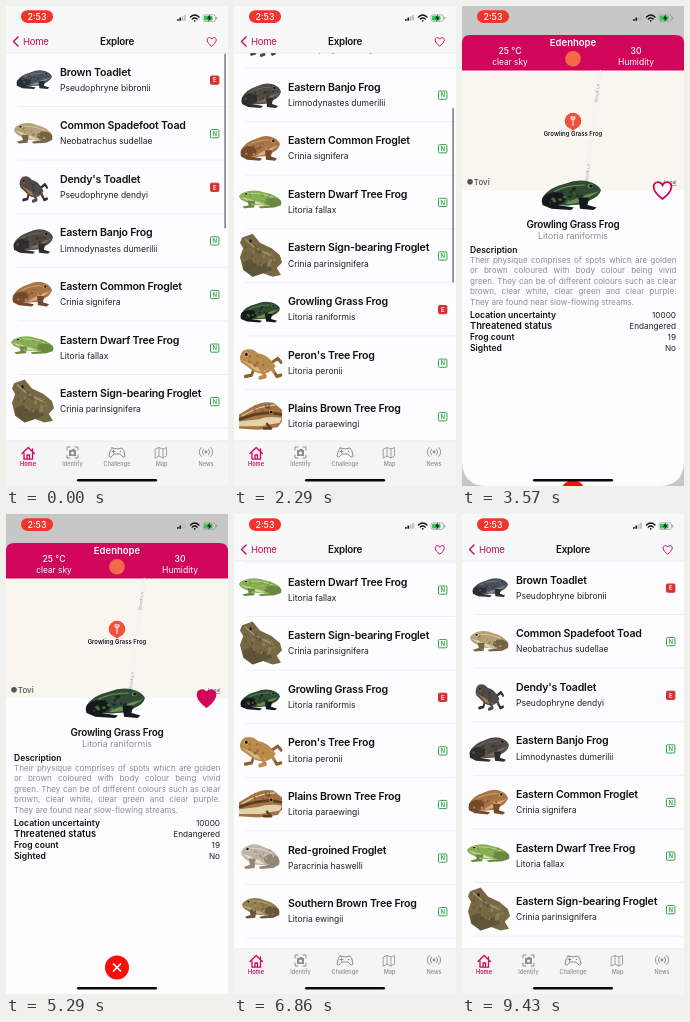
An HTML page for the animation above (9.57 s loop, 222 by 480 pixels).

```html
<!DOCTYPE html>
<html lang="en">
<head>
<meta charset="utf-8">
<title>Explore frogs</title>
<style>
  html, body { margin: 0; width: 100%; height: 100%; overflow: hidden; background: #fdfcfe; }
  svg { display: block; width: 100vw; height: 100vh; font-family: Inter, Roboto, "Liberation Sans", sans-serif; }
  .name { font-size: 10.6px; font-weight: 600; letter-spacing: -.21px; fill: #111; }
  .latin { font-size: 8.5px; fill: #222; }
  .bold { font-weight: 600; fill: #111; }
  .mid { text-anchor: middle; }
  .end { text-anchor: end; }
  .about { font-size: 8.1px; line-height: 10.5px; color: #8e8e92; }
  .about div { height: 10.5px; text-align-last: justify; }
  .about div:last-child { text-align-last: left; }
</style>
</head>
<body>
<svg id="stage" viewBox="0 0 222 480" preserveAspectRatio="none"></svg>
<script>
const LOOP = 9570, STEP = LOOP / 67;
const ROW = 53.6, LIST_TOP = 47, PINK = '#d1065b', PAPER = '#fdfcfe';
const HEART = 'M0 4.2C-6.2-.4-4.6-4-2.2-4Q-.7-4 0-2.5Q.7-4 2.2-4C4.6-4 6.2-.4 0 4.2Z';

const text = (x, y, str, cls = '', extra = '') =>
  `<text x="${x}" y="${y}" class="${cls}" ${extra}>${str}</text>`;
const path = (d, fill, extra = '') => `<path d="${d}" fill="${fill}" ${extra}/>`;
const line = (d, color, width = 1) =>
  path(d, 'none', `stroke="${color}" stroke-width="${width}" stroke-linecap="round" stroke-linejoin="round"`);
const rect = (x, y, w, h, fill, extra = '') =>
  `<rect x="${x}" y="${y}" width="${w}" height="${h}" fill="${fill}" ${extra}/>`;
const dot = (x, y, r, fill, extra = '') => `<circle cx="${x}" cy="${y}" r="${r}" fill="${fill}" ${extra}/>`;

function random(seed) {
  return () => (seed = (seed * 16807) % 2147483647) / 2147483647;
}

function speckles(seed, color, x, y, w, h, count = 14) {
  const next = random(seed * 7919 + 17);
  let out = '';
  for (let i = 0; i < count; i++) {
    out += dot((x + next() * w).toFixed(1), (y + next() * h).toFixed(1), (.4 + next() * .9).toFixed(1), color, 'opacity=".6"');
  }
  return out;
}

// Poses are drawn in a 40 x 24 space with the head on the right.
const poses = {
  sit: ([skin, dark, pale], seed) =>
    path('M1 14Q5 6 16 3Q24-1 31 1Q38 3 40 8Q39 13 33 16Q29 20 21 20Q8 22 1 14Z', skin) +
    path('M39 9Q33 13 29 16Q23 20 16 19Q25 13 39 9Z', pale) +
    path('M1 20Q-1 13 5 11Q12 8 16 13Q18 18 11 20L22 22L20 24L7 23Z', dark) +
    path('M25 14L32 14L31 20L37 22L35 24L26 23Z', dark) +
    line('M9 9Q17 4 29 4', pale, .8) +
    speckles(seed, dark, 9, 6, 23, 9) + speckles(seed + 50, pale, 4, 9, 24, 10, 8) +
    dot(33, 4.8, 1.8, pale) + dot(33.3, 4.8, 1.2, '#111'),

  climb: ([skin, dark, pale], seed) =>
    line('M12 13L3 8L0 11M9 15L4 22L0 21M25 14L28 21L34 22', dark, 2.6) +
    path('M5 14Q12 5 22 4Q28-1 36 2Q41 6 38 11Q31 15 26 18Q14 23 5 14Z', skin) +
    path('M38 9Q30 13 25 17Q18 20 14 18Q26 13 38 9Z', pale) +
    line('M20 15L15 22L20 23M12 12L7 18', skin, 3) +
    speckles(seed, dark, 12, 6, 19, 8) +
    dot(33, 5, 2, pale) + dot(33, 5, 1.3, '#111'),

  rough: ([skin, dark, pale], seed) =>
    path('M2 2L12 0L19 5L30 8L38 12L40 16L35 19L39 23L31 24L22 22L12 24L3 20L0 13L3 8L0 5Z', skin) +
    path('M3 16L10 14L17 18L27 16L31 20L22 22L12 24L3 20Z', dark, 'opacity=".6"') +
    line('M5 3L15 8L29 12', pale, 1) +
    speckles(seed, dark, 5, 7, 16, 13) + speckles(seed + 50, pale, 12, 9, 22, 10) +
    dot(10, 4, 1, '#111'),

  closeup: ([skin, dark, pale], seed) =>
    path('M0 7L8 1Q18-1 29 5L40 11V23L22 24L4 22L0 17Z', skin) +
    path('M0 14Q12 12 22 15L40 17V21L20 21L2 18Z', pale) +
    line('M1 11Q16 7 39 15', dark, 2.4) + line('M7 3Q20 3 37 12', pale, 1) +
    line('M14 19L10 23L17 23', dark, 2) + speckles(seed, dark, 8, 3, 18, 6) +
    dot(10, 9, 2, '#c78f48') + dot(10, 9, 1.2, '#111')
};

function frog(pose, colors, x, y, w, h, left, seed) {
  const flip = left ? `translate(${x + w} ${y}) scale(${-w / 40} ${h / 24})`
                    : `translate(${x} ${y}) scale(${w / 40} ${h / 24})`;
  return `<g transform="${flip}">${poses[pose](colors, seed)}</g>`;
}

const growling = ['#2f4a35', '#14191b', '#6f9150'];
// name, latin, endangered, pose, colours, x, y offset, width, height, faces left
const species = [
  ['Brown Toadlet', 'Pseudophryne bibronii', 1, 'sit', ['#4b515b', '#292e37', '#858a92'], 10, -10, 36, 19, 0],
  ['Common Spadefoot Toad', 'Neobatrachus sudellae', 0, 'sit', ['#b5a077', '#776444', '#e0d3ae'], 8, -11, 39, 21, 1],
  ["Dendy's Toadlet", 'Pseudophryne dendyi', 1, 'climb', ['#514b47', '#34302f', '#a47b4d'], 13, -12, 28, 27, 1],
  ['Eastern Banjo Frog', 'Limnodynastes dumerilii', 0, 'sit', ['#4f4b46', '#2f2d2b', '#776d61'], 7, -12, 40, 25, 0],
  ['Eastern Common Froglet', 'Crinia signifera', 0, 'sit', ['#a87445', '#75492b', '#d6ac80'], 6, -13, 40, 25, 0],
  ['Eastern Dwarf Tree Frog', 'Litoria fallax', 0, 'sit', ['#86b052', '#68893f', '#d5d7a5'], 5, -12, 43, 18, 1],
  ['Eastern Sign-bearing Froglet', 'Crinia parinsignifera', 0, 'rough', ['#756843', '#4f4830', '#a0946c'], 6, -22, 42, 43, 0],
  ['Growling Grass Frog', 'Litoria raniformis', 1, 'sit', growling, 6, -8, 40, 21, 0],
  ["Peron's Tree Frog", 'Litoria peronii', 0, 'climb', ['#b98b4d', '#8c6131', '#dcba7f'], 5, -15, 42, 31, 1],
  ['Plains Brown Tree Frog', 'Litoria paraewingi', 0, 'closeup', ['#a47343', '#5c3c23', '#e3d1ac'], 5, -15, 43, 28, 1],
  ['Red-groined Froglet', 'Paracrinia haswelli', 0, 'sit', ['#c0b6a6', '#948672', '#e6dfd3'], 7, -14, 39, 25, 1],
  ['Southern Brown Tree Frog', 'Litoria ewingii', 0, 'sit', ['#937f54', '#66563a', '#bda879'], 8, -14, 38, 21, 1]
];

function badge(y, endangered) {
  const [letter, fill, ink] = endangered ? ['E', '#d9302f', '#fff'] : ['N', '#fff', '#31a348'];
  return rect(204.5, y - 4, 8.4, 8.2, fill, `rx="1" stroke="${endangered ? fill : ink}"`) +
    text(208.7, y + 2.3, letter, 'mid', `font-size="6" font-weight="600" fill="${ink}"`);
}

function listRow([name, latin, endangered, pose, colors, x, dy, w, h, left], i) {
  const y = 74 + ROW * i;
  return line(`M12 ${y + 26.5}H222`, '#e6e5e8', .6) +
    frog(pose, colors, x, y + dy, w, h, left, i + 1) +
    text(54, y - 4.4, name, 'name') + text(54, y + 10.8, latin, 'latin') + badge(y, endangered);
}

const navBar = () => rect(0, 0, 222, LIST_TOP, '#f8f8f8') +
  line('M0 47H222', '#dcdcde', .5) +
  line('M12 31L7.5 35.5L12 40', PINK, 1.4) +
  text(17, 39, 'Home', '', `font-size="9.5" letter-spacing="-.25" fill="${PINK}"`) +
  text(111, 39, 'Explore', 'bold mid', 'font-size="9.8" letter-spacing="-.25"') +
  path(HEART, 'none', `stroke="${PINK}" stroke-width=".9" transform="translate(205.7 35.8) scale(1.05)"`);

function tabBar() {
  const gray = '#8d8d92';
  const icons = [
    line('M16 447.5L22.2 441.5L28.4 447.5M18 447V453.2H26.5V447M21 453V449H23.5V453M26.5 443V445', PINK, 1.3),
    line('M61 444V441H64M69 441H72V444M72 449V452H69M64 452H61V449', gray, 1) +
      path('M63 444H65L66 443H68L69 444H70V450H63Z', gray) + dot(66.5, 447, 1.5, '#f7f7f7'),
    line('M106 442Q111 444 116 442Q118 443 119 450Q118 453 114 448H108Q104 453 103 450Q104 443 106 442ZM106 445.5H109M107.5 444V447', gray, 1) +
      dot(114.5, 445.5, .8, gray),
    line('M149.5 443L153 441.5L157 443L160.5 441.5V450L157 452L153 450L149.5 452ZM153 441.5V450M157 443V452', gray, .8),
    dot(200, 446, 1.4, gray) +
      line('M197.5 443Q195 446 197.5 449M202.5 443Q205 446 202.5 449M195.3 441.5Q191 446 195.3 450.5M204.7 441.5Q209 446 204.7 450.5', gray, .9)
  ];
  const labels = ['Home', 'Identify', 'Challenge', 'Map', 'News'];
  return rect(0, 435, 222, 45, '#f5f5f6') + line('M0 435H222', '#d4d4d7', .5) + icons.join('') +
    labels.map((label, i) => text(22 + 44.5 * i, 459.8, label, 'mid',
      `font-size="5.6" font-weight="${i ? 500 : 600}" fill="${i ? gray : PINK}"`)).join('');
}

const statusBar = () => rect(15, 4.3, 32, 12.6, '#f0362c', 'rx="6.2"') +
  text(31, 13.7, '2:53', 'mid', 'font-size="8.8" font-weight="500" fill="#fff"') +
  [0, 1, 2, 3].map(i => rect(171 + 2.4 * i, 13 - 1.4 * i, 1.7, 1.8 + 1.4 * i, i < 2 ? '#111' : '#bbb', 'rx=".4"')).join('') +
  line('M184.5 11Q188.7 7.2 193 11M186.3 13Q188.7 11 191.2 13', '#111', 1.4) + dot(188.7, 14.8, .9, '#111') +
  rect(197, 8.8, 12.5, 6.6, 'none', 'rx="2" stroke="#999" stroke-width=".7"') +
  rect(198, 9.8, 8.5, 4.6, '#35c759', 'rx="1.2"') + rect(210.2, 10.8, 1, 2.6, '#999', 'rx=".5"') +
  path('M204 8.5L201 12.5H203L202.3 15.8L205.5 11.6H203.5Z', '#111');

function mapView() {
  const road = (x, y) => text(x, y, 'Brook Ln', 'mid', `font-size="4.3" fill="#999" transform="rotate(-83 ${x} ${y})"`);
  return rect(0, 64.5, 222, 119.5, '#f9f6ef') +
    line('M138.5 65L122.5 184', '#e9e7e5', 2.2) + line('M138.5 65L122.5 184', '#fdfcfa', 1.2) +
    road(136.5, 87) + road(127, 167) +
    path('M108 122L111 125L114 122Z', '#ef513c') + dot(111, 115, 8.3, '#ef513c') +
    line('M109.2 110.5V113Q111 114.5 112.8 113V110.5M111 110.5V119.5', '#fff', 1) +
    text(111, 130.2, 'Growling Grass Frog', 'mid bold', 'font-size="5.9" letter-spacing=".05" stroke="#fff" stroke-width="1" paint-order="stroke"') +
    dot(8, 175.7, 2.8, '#55555a') +
    text(11.8, 178.5, 'Tovi', '', 'font-size="8" font-weight="500" fill="#55555a"') +
    text(214.5, 178, 'Legal', 'end', 'font-size="5" fill="#555" text-decoration="underline"');
}

function sheet() {
  const white = (x, y, str, size, weight = 500) =>
    text(x, y, str, 'mid', `font-size="${size}" font-weight="${weight}" fill="#fff"`);
  const about = ['Their physique comprises of spots which are golden', 'or brown coloured with body colour being vivid',
    'green. They can be of different colours such as clear', 'brown, clear white, clear green and clear purple.',
    'They are found near slow-flowing streams.'];
  const facts = [['Location uncertainty', '10000'], ['Threatened status', 'Endangered'], ['Frog count', '19'], ['Sighted', 'No']];
  return path('M0 480V37Q0 29 8 29H214Q222 29 222 37V480Z', PAPER) +
    path('M0 65V37Q0 29 8 29H214Q222 29 222 37V65Z', PINK) +
    white(111, 40.2, 'Edenhope', 9.5, 600) + white(48, 48.3, '25 °C', 8.6) + white(48, 59, 'clear sky', 8.3, 400) +
    white(174, 48.3, '30', 8.6) + white(174, 59, 'Humidity', 8.5, 400) + dot(111, 52.7, 7.8, '#f16b49') +
    mapView() + frog('sit', growling, 79, 174, 60, 30, 0, 8) +
    path(HEART, '#fff', `id="heart" stroke="${PINK}" stroke-width=".9" transform="translate(200.5 184.3) scale(2.05)"`) +
    text(111, 221.5, 'Growling Grass Frog', 'name mid', 'style="font-size:9.9px"') +
    text(111, 233.4, 'Litoria raniformis', 'mid', 'font-size="8.8" fill="#8e8e92"') +
    text(8, 247.2, 'Description', 'bold', 'font-size="8.5"') +
    `<foreignObject x="8" y="248.9" width="206.5" height="54"><div xmlns="http://www.w3.org/1999/xhtml" class="about">${
      about.map(row => `<div>${row}</div>`).join('')}</div></foreignObject>` +
    facts.map(([label, value], i) => {
      const y = 312.2 + 10.9 * i;
      return text(8, y, label, 'bold', `font-size="${i === 1 ? 9.3 : 8.6}"`) +
        text(214, y, value, 'end', 'font-size="8.2" fill="#222"');
    }).join('') +
    `<g id="close">${dot(111, 453.5, 12, '#fa0d0b')}${line('M107.5 450L114.5 457M114.5 450L107.5 457', '#fff', 1.7)}</g>`;
}

const stage = document.getElementById('stage');
stage.innerHTML = rect(0, 0, 222, 480, PAPER) +
  `<g id="list">${species.map(listRow).join('')}</g>` + navBar() + tabBar() +
  rect(218.2, 0, 1.8, 175, '#8f8f93', 'id="thumb" rx=".9"') +
  rect(0, 0, 222, 480, '#000', 'id="dim"') +
  `<g id="sheet">${sheet()}</g>` +
  `<g id="corners">${path('M0 456Q1 480 25 480H0ZM222 456Q221 480 197 480H222Z', '#c6c6c7')}</g>` +
  statusBar() + rect(71, 473, 80, 2.6, '#080808', 'rx="1.3"');

const part = Object.fromEntries(['list', 'thumb', 'dim', 'sheet', 'heart', 'close', 'corners']
  .map(id => [id, document.getElementById(id)]));

const linear = k => k;
const easeOut = k => 1 - (1 - k) ** 3;
const easeInOut = k => k * k * (3 - 2 * k);
const tween = (t, from, to, ease) => ease(Math.min(1, Math.max(0, (t - from) / (to - from))));
const moveY = (el, y) => el.setAttribute('transform', `translate(0 ${y.toFixed(2)})`);
const show = (el, opacity) => el.setAttribute('opacity', opacity);

function draw(t) {
  const scroll = 266 * (tween(t, 1530, 2950, easeInOut) - tween(t, 7300, 7750, easeInOut));
  const open = tween(t, 3050, 3500, easeOut) - tween(t, 5500, 6000, easeInOut);
  const flash = 1 - tween(t, 500, 800, linear);
  const scrolling = tween(t, 1400, 1550, linear) - tween(t, 3500, 3600, linear);

  moveY(part.list, -scroll);
  moveY(part.thumb, LIST_TOP + .5 + scroll * .372);
  show(part.thumb, Math.max(flash, scrolling));
  show(part.dim, .2 * open);
  moveY(part.sheet, 455 * (1 - open));
  show(part.sheet, open > 0 ? 1 : 0);
  moveY(part.close, 33 * (1 - tween(t, 3570, 3950, easeOut)));
  part.heart.setAttribute('fill', t >= 4600 ? PINK : '#fff');
  show(part.corners, t > 3450 && t < 3700 ? 1 : 0);
}

const start = performance.now();
function frame() {
  const t = (performance.now() - start) % LOOP;
  draw(Math.floor((t + 8) / STEP) * STEP % LOOP);
  requestAnimationFrame(frame);
}
draw(0);
requestAnimationFrame(frame);
</script>
</body>
</html>
```
